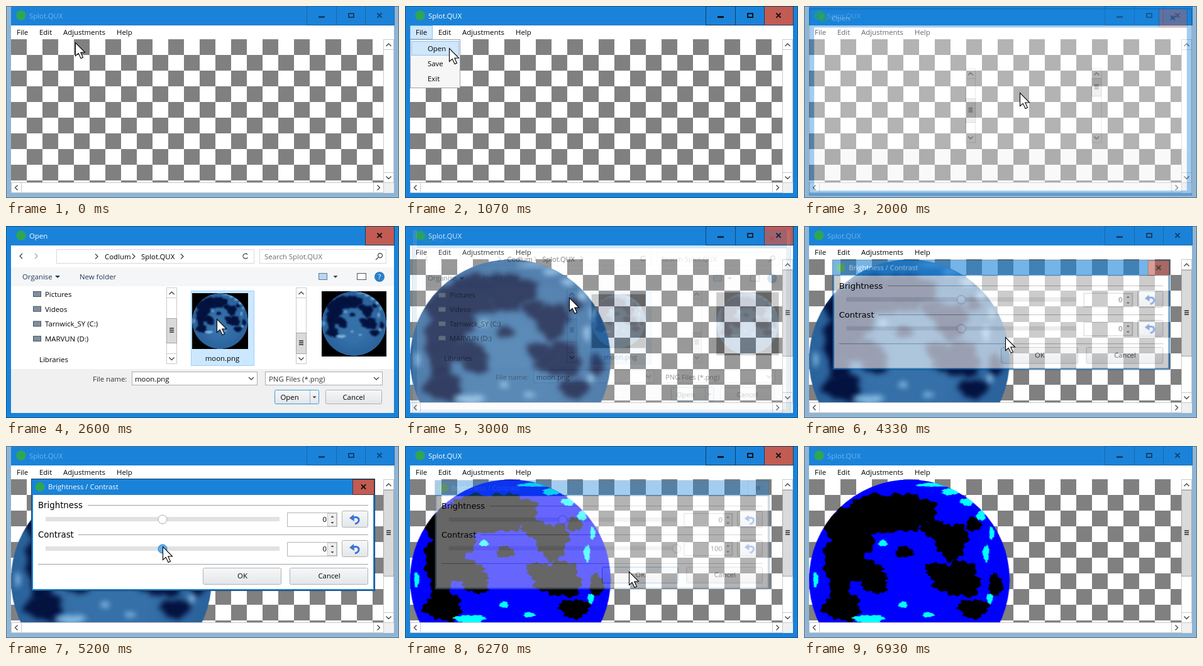
Recreate the animation shown at these times as an HTML page with a canvas. Size 625 by 306 pixels, loop 6.99 s.

```html
<!DOCTYPE html>
<html lang="en">
<head>
<meta charset="utf-8">
<title>Brightness / Contrast</title>
<style>
html, body { margin: 0; width: 100%; height: 100%; overflow: hidden; background: #fff; }
canvas { display: block; width: 625px; height: 306px; }
</style>
</head>
<body>
<canvas id="stage" width="625" height="306"></canvas>
<script>
const W = 625, H = 306, LOOP = 6990, STEP = 200 / 3;
const FILE_CLOSE = 2840, ADJUST_CLOSE = 6147;
const APP = 'Splot.QUX';
const BLUE = '#1a83d9', PALE = '#8fb5d5', RED = '#c25b52', GREEN = '#2ea653', FAINT = '#70b5ea';
const UI = '11.4px "Open Sans", "Noto Sans", sans-serif';
const LABEL = '13.3px "DejaVu Sans", sans-serif';

const stage = document.getElementById('stage').getContext('2d');
const layer = makeCanvas(W, H);
let g = stage;

function makeCanvas(w, h) {
  const c = document.createElement('canvas');
  c.width = w;
  c.height = h;
  return c.getContext('2d');
}

// Drawing helpers
function rect(x, y, w, h, fill) {
  g.fillStyle = fill;
  g.fillRect(x, y, w, h);
}

function box(x, y, w, h, fill, edge) {
  rect(x, y, w, h, edge);
  rect(x + 1, y + 1, w - 2, h - 2, fill);
}

function text(s, x, y, color = '#000', align = 'left', font = UI) {
  g.font = font;
  g.textAlign = align;
  g.fillStyle = color;
  g.fillText(s, x, y);
}

function line(points, color, width = 1) {
  g.beginPath();
  points.forEach(([x, y]) => g.lineTo(x, y));
  g.strokeStyle = color;
  g.lineWidth = width;
  g.stroke();
}

function disc(x, y, r, fill, edge) {
  g.beginPath();
  g.arc(x, y, r, 0, 7);
  g.fillStyle = fill;
  g.fill();
  if (edge) {
    g.strokeStyle = edge;
    g.lineWidth = 1;
    g.stroke();
  }
}

function chevron(x, y, dx, dy, color = '#484848') {
  const p = s => [x - dx * 2 + s * dy * 4, y - dy * 2 + s * dx * 4];
  line([p(-1), [x + dx * 2, y + dy * 2], p(1)], color, 1.4);
}

function caret(x, y, up, color = '#333', r = 2.5) {
  const d = up ? -r : r;
  g.beginPath();
  g.moveTo(x - r, y - d / 2);
  g.lineTo(x + r, y - d / 2);
  g.lineTo(x, y + d / 2);
  g.fillStyle = color;
  g.fill();
}

function cross(x, y, r, color) {
  line([[x - r, y - r], [x + r, y + r]], color, 2);
  line([[x + r, y - r], [x - r, y + r]], color, 2);
}

function button(x, y, w, h, edge = '#adb2b8') {
  const grad = g.createLinearGradient(0, y, 0, y + h);
  grad.addColorStop(0, '#f7f8f9');
  grad.addColorStop(1, '#e3e5e8');
  g.beginPath();
  g.roundRect(x + .5, y + .5, w - 1, h - 1, 2);
  g.fillStyle = grad;
  g.fill();
  g.strokeStyle = edge;
  g.lineWidth = 1;
  g.stroke();
}

function vbar(x, y, h, thumb) {
  box(x, y, 17, h, '#fff', '#c9c9c9');
  box(x, y, 17, 17, '#fff', '#c9c9c9');
  box(x, y + h - 17, 17, 17, '#fff', '#c9c9c9');
  chevron(x + 8.5, y + 9, 0, -1);
  chevron(x + 8.5, y + h - 8.5, 0, 1);
  if (!thumb) return;
  const [ty, th] = thumb;
  box(x, ty, 17, th, '#dadada', '#a6a6a6');
  for (let i = -1; i < 2; i++) rect(x + 5, Math.round(ty + th / 2) + i * 3 - 2, 7, 2, '#555');
}

// Moon: [x, y, rx, ry] patches on a 320px disc
const DARK = [
  [105, 46, 46, 20], [160, 52, 40, 30], [70, 82, 40, 44], [104, 70, 34, 18],
  [48, 130, 26, 34], [196, 78, 18, 14], [84, 148, 40, 18], [48, 172, 16, 22],
  [226, 98, 27, 29], [238, 160, 36, 28], [297, 169, 11, 18], [262, 206, 24, 15],
  [106, 168, 20, 14], [262, 72, 12, 11], [204, 146, 18, 14], [54, 204, 30, 22],
  [152, 116, 14, 9]
];
const LIGHT = [
  [118, 102, 7, 5], [11, 160, 4, 12], [282, 118, 5, 13], [196, 9, 24, 3],
  [226, 20, 15, 5], [252, 36, 11, 6], [274, 58, 7, 8], [291, 86, 4, 10],
  [96, 223, 24, 7], [150, 200, 7, 5], [190, 216, 9, 4], [288, 190, 5, 8]
];

function patch(c, [x, y, rx, ry], i, fill) {
  c.beginPath();
  for (let a = 0; a < 6.28; a += .08) {
    const k = 1 + .12 * Math.sin(a * 3 + i * 2) + .08 * Math.sin(a * 7 + i * 5) + .07 * Math.sin(a * 15 + i);
    c.lineTo(x + Math.cos(a) * rx * k, y + Math.sin(a) * ry * k);
  }
  c.fillStyle = fill;
  c.fill();
}

function makeMoon(inner, outer, dark, light, blur) {
  const c = makeCanvas(320, 320);
  c.beginPath();
  c.arc(160, 160, 159.5, 0, 7);
  c.clip();
  const grad = c.createRadialGradient(160, 190, 60, 160, 160, 160);
  grad.addColorStop(0, inner);
  grad.addColorStop(1, outer);
  c.fillStyle = grad;
  c.fillRect(0, 0, 320, 320);
  if (blur) c.filter = `blur(${blur}px)`;
  DARK.forEach((p, i) => patch(c, p, i, dark));
  LIGHT.forEach((p, i) => patch(c, p, i, light));
  return c.canvas;
}

const softMoon = makeMoon('#3570a8', '#2a629b', '#03123f', '#84b9e2', 4);
const hardMoon = makeMoon('#0000ff', '#0000ff', '#000', '#00ffff');

// Window parts
function frame(title, active) {
  const edge = active ? '#0d3f68' : '#1668ad';
  const ink = active ? '#06121c' : '#10426e';
  rect(0, 0, W, H, active ? '#104f82' : '#566d80');
  rect(1, 1, W - 2, H - 2, active ? BLUE : PALE);
  rect(8, 1, 609, 30, BLUE);
  rect(8, 31, 609, 267, '#fff');
  disc(24, 15, 7.8, GREEN);
  text(title, 37, 20, active ? '#fff' : FAINT);
  box(571, 0, 47, 31, active ? RED : BLUE, edge);
  cross(594, 15, 3.6, ink);
  return { edge, ink };
}

function mainWindow(q, active) {
  const { edge, ink } = frame(APP, active);
  g.strokeStyle = edge;
  g.lineWidth = 1;
  g.strokeRect(478.5, .5, 47, 30);
  g.strokeRect(525.5, .5, 46, 30);
  rect(497, 16, 10, 3, ink);
  g.strokeStyle = ink;
  g.lineWidth = 2;
  g.strokeRect(545, 12, 8, 6);

  const open = MENUS.find(m => q >= m.from && q < m.to);
  if (open) box(open.x, 31, open.head, 22, '#cfe6fb', '#8fc3f0');
  [['File', 17], ['Edit', 53], ['Adjustments', 91], ['Help', 176]].forEach(([s, x]) => text(s, x, 46));

  g.save();
  g.beginPath();
  g.rect(8, 53, 592, 228);
  g.clip();
  for (let r = 0; r < 10; r++) {
    for (let c = r % 2; c < 24; c += 2) rect(8 + c * 25, 53 + r * 25, 25, 25, '#808080');
  }
  const loaded = q > 2860;
  if (loaded) g.drawImage(q > 6100 ? hardMoon : softMoon, 7.5, 53);
  g.restore();

  vbar(600, 53, 229, loaded && [70, 138]);
  box(8, 281, 593, 17, '#fff', '#c9c9c9');
  box(8, 281, 17, 17, '#fff', '#c9c9c9');
  box(584, 281, 17, 17, '#fff', '#c9c9c9');
  chevron(16.5, 289.5, -1, 0);
  chevron(592.5, 289.5, 1, 0);
  rect(601, 282, 16, 16, '#f0f0f0');
  if (open) dropdown(open, q);
}

const MENUS = [
  { from: 390, to: 1390, hot: 860, x: 8, w: 80, head: 36, items: ['Open', 'Save', 'Exit'] },
  { from: 3590, to: 4060, hot: 3720, x: 82, w: 164, head: 85,
    items: ['Brightness / Contrast', 'Hue / Saturation', 'Invert colours', 'Greyscale'] }
];

function dropdown(m, q) {
  g.globalAlpha = Math.min(1, (q - m.from + 60) / 190);
  box(m.x, 53, m.w, m.items.length * 24 + 6, '#f6f6f6', '#a0a0a0');
  m.items.forEach((s, i) => {
    const y = 56 + i * 24;
    if (!i && q > m.hot) box(m.x + 2, y, m.w - 4, 23, '#cfe6fb', '#8fc3f0');
    text(s, m.x + 28, y + 16);
  });
  g.globalAlpha = 1;
}

// File dialog
function fileLabels(q) {
  if (q < 2100) return;
  text('Codlum', 157, 53);
  text(APP, 215, 53);
  text('Organise', 26, 85, '#1e395b');
  text('New folder', 117, 85, '#1e395b');
  ['Pictures', 'Videos', 'Tarnwick_SY (C:)', 'MARVUN (D:)'].forEach((s, i) => {
    text(s, 62, 113 + i * 23.7);
    box(43, 104 + i * 23.7, 13, 9, '#7f8fa0', '#49525c');
  });
  text('Libraries', 53, 217);
  text('File name:', 138, 248, '#333');
  if (q > 2590) text('moon.png', 205, 248);
  text('PNG Files (*.png)', 418, 248, '#333');
}

function fileDialog(q) {
  frame('Open', q < FILE_CLOSE);
  rect(8, 228, 609, 70, '#f0f0f0');
  vbar(255, 98, 122, [147, 40]);
  vbar(461, 98, 122, q < 2100 ? [114, 30] : [170, 34]);
  if (q < 2100) return;

  chevron(24, 48, -1, 0);
  chevron(48, 48, 1, 0, '#aaa');
  box(80, 37, 315, 23, '#fff', '#d9d9d9');
  [144, 203, 280].forEach(x => chevron(x, 48.5, 1, 0));
  g.beginPath();
  g.arc(381, 48, 4, .6, 5.6);
  g.strokeStyle = '#555';
  g.stroke();
  box(403, 37, 202, 23, '#fff', '#d9d9d9');
  text('Search ' + APP, 411, 53, '#6d6d6d');
  g.beginPath();
  g.arc(595, 47, 3.5, 0, 7);
  g.stroke();
  line([[592, 50], [588, 54]], '#555', 1.5);

  rect(8, 66, 609, 30, '#f5f6f7');
  caret(82, 81, false, '#1e395b', 4);
  box(497, 75, 14, 11, '#b9d7f1', '#60788c');
  caret(524, 81, false, '#333', 3.5);
  box(558, 75, 15, 11, '#fff', '#555');
  disc(594, 81, 8, '#2c7fc4');
  text('?', 594, 85, '#fff', 'center');

  const picked = q > 2590;
  box(294, 103, 101, 120, picked ? '#cce8ff' : '#e5f3ff', '#99d1ff');
  rect(296, 107, 89, 89, '#000');
  g.drawImage(softMoon, 296, 107, 89, 89);
  text('moon.png', 344, 215, '#000', 'center');
  if (picked) {
    rect(502, 104, 103, 104, '#000');
    g.drawImage(softMoon, 502, 104, 103, 103);
  }

  box(200, 232, 200, 22, '#fff', '#abadb3');
  box(412, 232, 187, 22, '#fff', '#abadb3');
  chevron(390, 243, 0, 1);
  chevron(589, 243, 0, 1);
  button(427, 261, 71, 23, '#3c9be0');
  line([[483.5, 262], [483.5, 283]], '#adb2b8');
  caret(490.5, 273, false, '#333', 3);
  text('Open', 451, 277, '#000', 'center');
  button(508, 261, 90, 23);
  text('Cancel', 553, 277, '#000', 'center');
}

// Brightness / contrast dialog
function undoIcon(x, y) {
  g.beginPath();
  g.moveTo(x - 3, y - 3);
  g.quadraticCurveTo(x + 7, y - 5, x + 6, y + 2);
  g.quadraticCurveTo(x + 5, y + 6, x, y + 7);
  g.strokeStyle = '#3b74d6';
  g.lineWidth = 3;
  g.stroke();
  g.beginPath();
  g.moveTo(x - 9, y - 2);
  g.lineTo(x - 2, y - 8);
  g.lineTo(x - 1, y + 3);
  g.fillStyle = '#3b74d6';
  g.fill();
}

function adjustLabels() {
  text('Brightness', 51, 99, '#000', 'left', LABEL);
  text('Contrast', 51, 146, '#000', 'left', LABEL);
}

function slider(y, lineX, value, hot) {
  rect(lineX, y - 23, 576 - lineX, 1, '#a0a0a0');
  rect(63, y - 4, 372, 7, '#e1e1e1');
  disc(249 + value * 1.86, y, 7, hot ? '#5fb0f2' : '#fff', hot ? '#2b7cc0' : '#adadad');
  box(447, y - 11, 80, 23, '#fff', '#b5b5b5');
  box(511, y - 10, 15, 21, '#efefef', '#c8c8c8');
  caret(519, y - 4.5, true);
  caret(519, y + 5.5, false);
  text(value, 510, y + 4, '#000', 'right');
  button(534, y - 14, 42, 27);
  undoIcon(555, y);
}

function adjustDialog(q) {
  const active = q < ADJUST_CLOSE;
  const [mx, my] = cursorAt(q);
  const dragged = q < 5190 ? 0 : q < 5530 ? (mx - 249) / 1.86 : 100;
  const value = Math.round(Math.max(0, Math.min(100, dragged)));
  box(40, 52, 547, 179, active ? BLUE : PALE, active ? '#1c3c58' : '#566d80');
  rect(41, 53, 545, 25, BLUE);
  rect(43, 78, 541, 150, '#fff');
  disc(54, 65, 7.5, GREEN);
  text('Brightness / Contrast', 67, 69, active ? '#fff' : FAINT);
  box(551, 53, 35, 25, active ? RED : BLUE, active ? '#4d3440' : '#1668ad');
  cross(568.5, 65, 3.6, active ? '#111' : '#10426e');
  const over = (y, x) => Math.hypot(mx - x, my - y) < 9;
  slider(117, 130, 0, over(117, 249));
  slider(164, 115, value, q < 5590 && (q > 5190 || over(164, 249)));
  rect(51, 188, 525, 1, '#a0a0a0');
  button(313, 194, 125, 27, q > 5800 ? '#3c8fdc' : undefined);
  text('OK', 376, 211, '#000', 'center');
  button(451, 194, 125, 27);
  text('Cancel', 514, 211, '#000', 'center');
}

// Fades a dialog with a slight zoom about its centre; plain labels stay darker
function popup(draw, labels, q, a, cx, cy, ink) {
  if (a <= 0) return;
  a = Math.min(1, a);
  g = layer;
  g.clearRect(0, 0, W, H);
  draw(q);
  g = stage;
  g.save();
  const s = .955 + .045 * a;
  g.translate(cx, cy);
  g.scale(s, s);
  g.translate(-cx, -cy);
  g.globalAlpha = a;
  g.drawImage(layer.canvas, 0, 0);
  g.globalAlpha = Math.min(1, a * ink);
  labels(q);
  g.restore();
}

// Pointer: [ms, x, y]
const PATH = [
  [0, 110, 58], [333, 26, 45], [734, 26, 45], [1067, 70, 67], [1334, 70, 67],
  [2000, 343, 138], [2134, 343, 138], [2400, 335, 148], [2667, 335, 148],
  [3533, 110, 45], [3600, 110, 45], [3933, 150, 66], [4001, 150, 66],
  [4133, 345, 200], [4733, 249, 113], [4801, 249, 113], [5200, 249, 160],
  [5533, 435, 162], [6000, 356, 200], [6267, 356, 200], [6733, 372, 312], [6990, 372, 312]
];

function cursorAt(q) {
  const i = Math.max(1, PATH.findIndex(p => p[0] >= q));
  const [t0, x0, y0] = PATH[i - 1], [t1, x1, y1] = PATH[i];
  const u = (q - t0) / (t1 - t0), e = u * u * (3 - 2 * u);
  return [Math.round(x0 + (x1 - x0) * e), Math.round(y0 + (y1 - y0) * e)];
}

function pointer([x, y]) {
  g.beginPath();
  [[0, 0], [0, 21], [4.7, 16.8], [8.6, 25], [12, 23.4], [8.3, 15.6], [15, 15.3]]
    .forEach(([a, b]) => g.lineTo(x + .5 + a, y + .5 + b));
  g.closePath();
  g.fillStyle = '#fff';
  g.fill();
  g.strokeStyle = '#000';
  g.lineWidth = 1.1;
  g.stroke();
}

const ACTIVE = [[390, 1860], [FILE_CLOSE, 4060], [ADJUST_CLOSE, 6920]];

function render(q) {
  mainWindow(q, ACTIVE.some(([a, b]) => q > a && q < b));
  const fileAlpha = q < 2500 ? (q - 1867) / 333 : 1 - (q - FILE_CLOSE) / 200;
  const adjustAlpha = q < 5000 ? (q - 4133) / 333 : 1 - (q - ADJUST_CLOSE) / 200;
  popup(fileDialog, fileLabels, q, fileAlpha, W / 2, H / 2, 2.5);
  popup(adjustDialog, adjustLabels, q, adjustAlpha, 313.5, 141.5, 2.5);
  pointer(cursorAt(q));
}

let start;
function tick(now) {
  start ??= now;
  const t = (now - start) % LOOP;
  render(Math.floor((t + 4) / STEP) * STEP);
  requestAnimationFrame(tick);
}
render(0);
requestAnimationFrame(tick);
</script>
</body>
</html>
```
